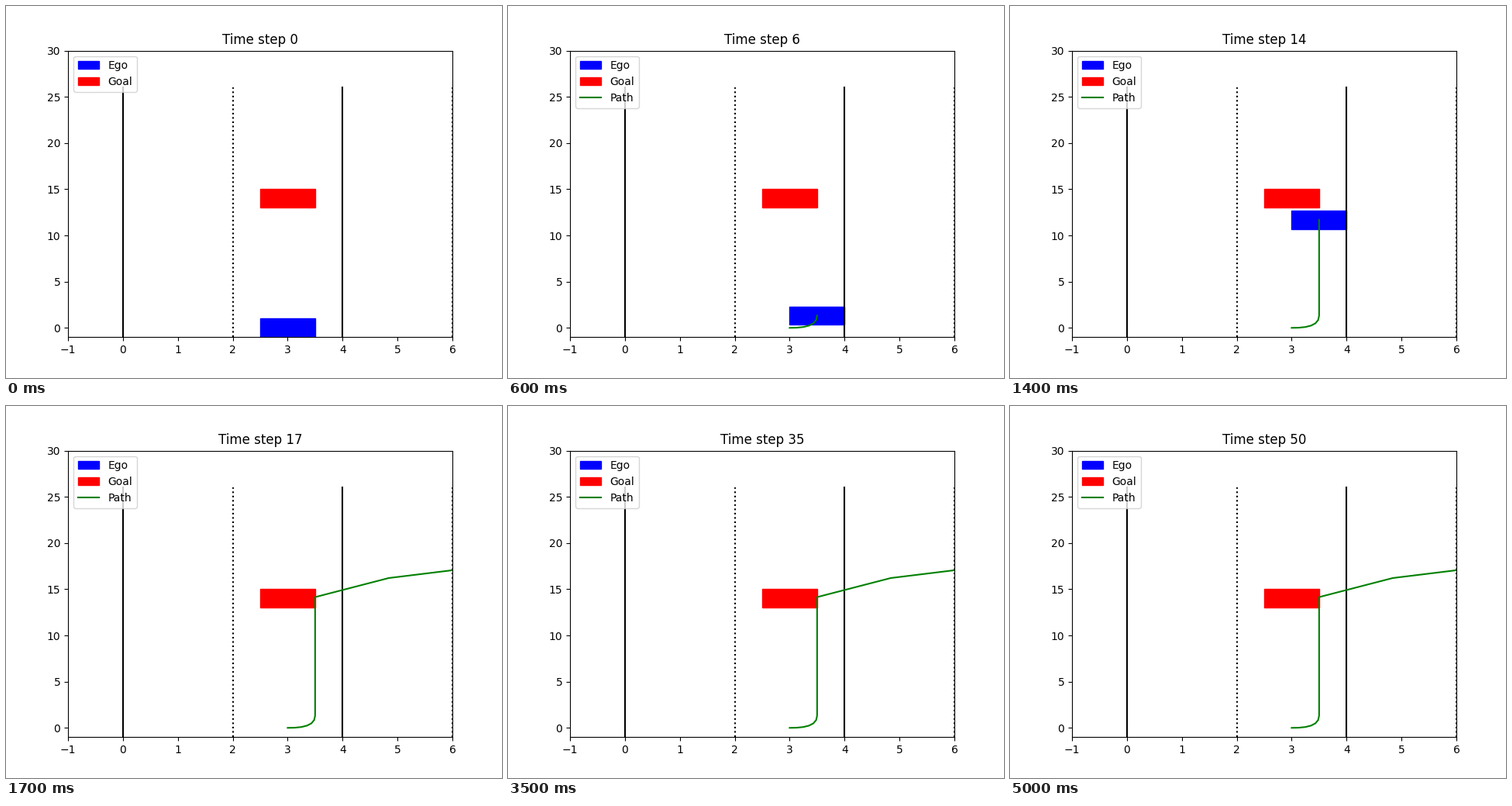
Animation, 640 px wide and 480 px high, one loop 5.1 s. Source, as a matplotlib script:

```python
import math

import matplotlib.pyplot as plt
from matplotlib.animation import FuncAnimation
from matplotlib.patches import Rectangle

STEPS = 51
CAR_W, CAR_H = 1, 2
GOAL = (3, 14)

TURN_STEPS = 6      # length of the initial sideways drift
SWERVE_STEP = 15    # last step of the straight run
TOP_SPEED = 2.46    # distance per step once at full speed


def drive(step):
    """Centre while drifting right, speeding up, then cruising straight."""
    x = 3 + 0.5 * math.sin(math.pi / 2 * min(step / TURN_STEPS, 1))
    speeding_up = 1.325 * (step / TURN_STEPS) ** 2.45
    cruising = 14.15 + TOP_SPEED * (step - SWERVE_STEP)
    return x, max(speeding_up, cruising)


def make_path():
    path = [drive(step) for step in range(SWERVE_STEP + 1)]
    heading = math.pi / 2
    while len(path) < STEPS:
        # The heading decays towards the x axis, out of the view.
        heading *= 0.633
        x, y = path[-1]
        path.append((x + TOP_SPEED * math.cos(heading),
                     y + TOP_SPEED * math.sin(heading)))
    return path


PATH = make_path()
fig, ax = plt.subplots(figsize=(6.4, 4.8), dpi=100)


def add_box(center, color, label):
    x, y = center
    corner = (x - CAR_W / 2, y - CAR_H / 2)
    ax.add_patch(Rectangle(corner, CAR_W, CAR_H, color=color, label=label))


def draw(step):
    ax.clear()
    for x, style in ((0, "-"), (2, ":"), (4, "-"), (6, ":")):
        ax.plot([x, x], [-1, 26], color="black", linestyle=style)

    add_box(PATH[step], "blue", "Ego")
    add_box(GOAL, "red", "Goal")
    if step > 0:
        ax.plot(*zip(*PATH[:step + 1]), color="green", label="Path")

    ax.set_xlim(-1, 6)
    ax.set_ylim(-1, 30)
    ax.set_title(f"Time step {step}")
    ax.legend(loc="upper left")
    return []


anim = FuncAnimation(fig, draw, frames=STEPS, interval=100,
                     repeat=True, repeat_delay=0)
plt.show()
```
